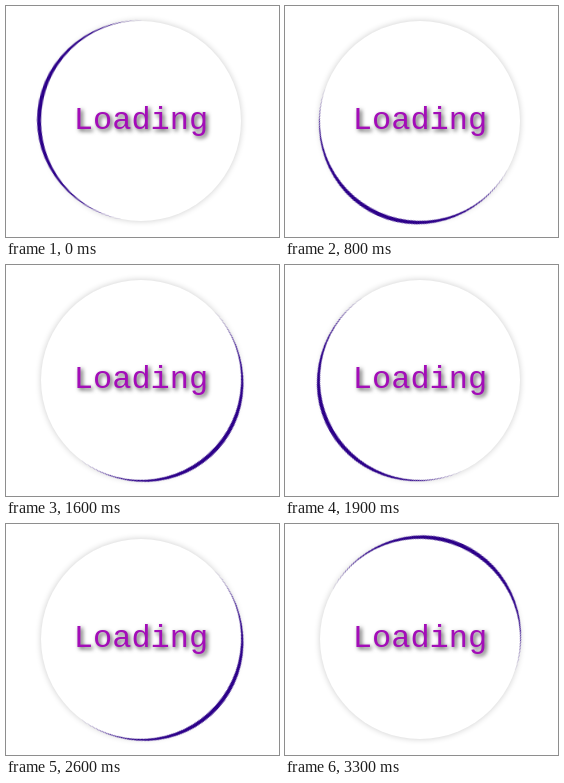
These frames come from a looping animation (273x231 px, 3.4 s). An HTML page:

```html
<!DOCTYPE html>
<html lang="en">
<head>
<meta charset="utf-8">
<title>Loading</title>
<style>
  html, body { margin: 0; width: 100%; height: 100%; overflow: hidden; background: #fff; }
  .stage { position: relative; width: 273px; height: 231px; overflow: hidden; }
  .disc {
    position: absolute; left: 35px; top: 14.5px; width: 200px; height: 200px;
    border-radius: 50%; background: #fff;
    box-shadow: 0 0 6px rgba(0, 0, 0, .2);
  }
  .label {
    position: absolute; left: 0; top: 97px; width: 270px;
    font: 32px/36px "Liberation Mono", "Courier New", monospace;
    text-align: center; color: #a30db8;
    text-shadow: 2px 2px 4px rgba(0, 0, 0, .7);
  }
  svg { position: absolute; left: 0; top: 0; }
  /* 34 steps of 36 degrees; the turn restarts with a jump */
  .arc { fill: #2c0089; animation: turn 3400ms steps(34, end) infinite; }
  @keyframes turn {
    from { transform: rotate(6deg); }
    to { transform: rotate(1230deg); }
  }
</style>
</head>
<body>
<div class="stage">
  <div class="disc"></div>
  <svg width="273" height="231">
    <g transform="translate(135 114.8)">
      <path class="arc" d="M0-100.5A104 100.5 0 0 0 0 100.5A100 100.5 0 0 1 0-100.5Z"/>
    </g>
  </svg>
  <div class="label">Loading</div>
</div>
</body>
</html>
```
